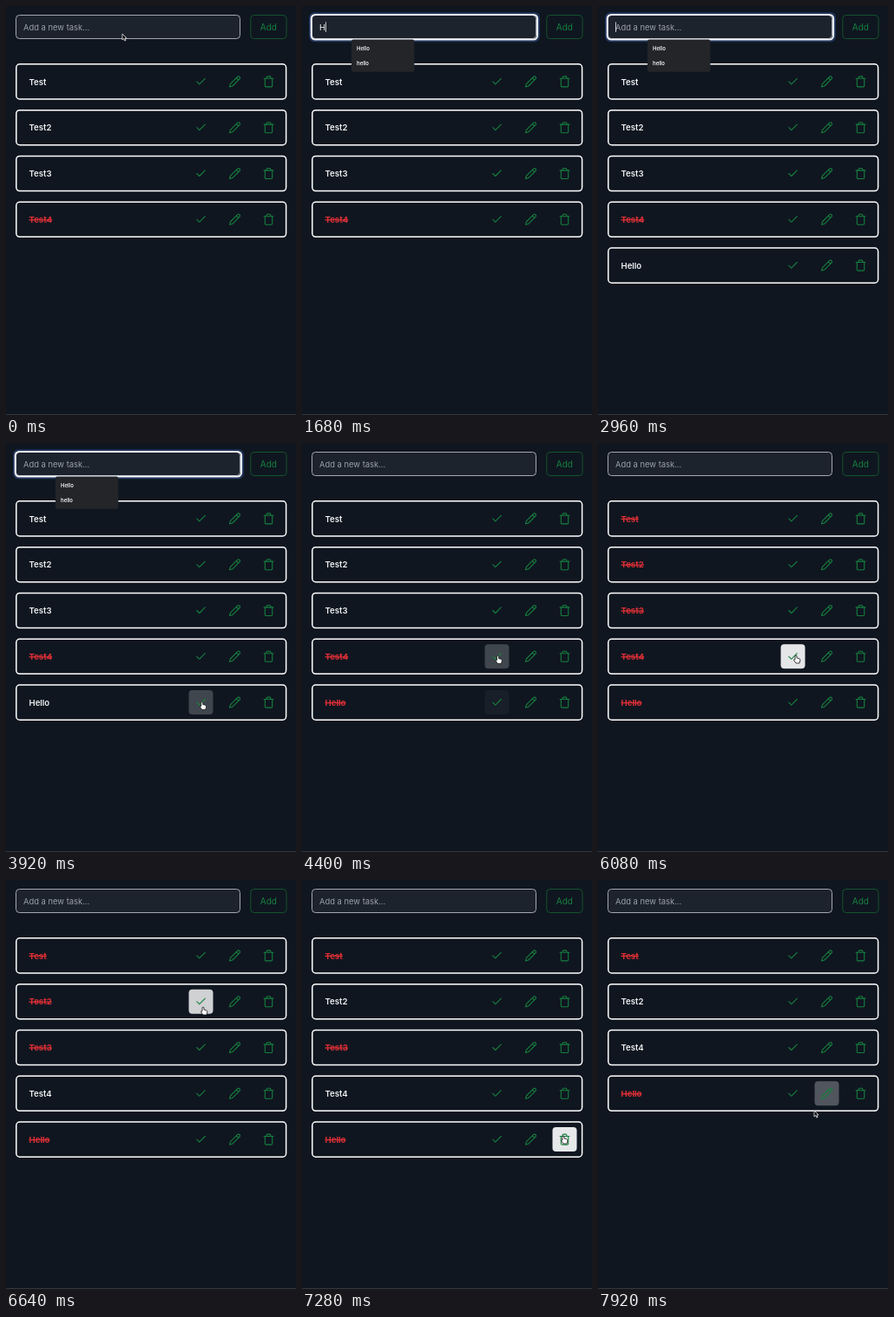
These frames come from a looping animation (334 by 470 pixels, 8 s). An HTML page:

```html
<!DOCTYPE html>
<html lang="en">
<head>
<meta charset="utf-8">
<title>Task list</title>
<style>
  html, body { margin: 0; width: 100%; height: 100%; overflow: hidden; background: #0f1620; }
  svg { display: block; font: 600 9.6px Inter, sans-serif; }
  .icon { fill: none; stroke: #17803f; stroke-width: 1.8; stroke-linecap: round; stroke-linejoin: round; }
  .done text { fill: #dc2f35; font-weight: 700; }
  .strike { stroke: #dc2f35; stroke-width: 1.3; visibility: hidden; }
  .done .strike { visibility: visible; }
</style>
</head>
<body>
<svg width="334" height="470" viewBox="0 0 334 470" fill="#f3f4f6">
  <rect y="469" width="334" height="1" fill="#33383f"/>
  <rect id="field" x="11.5" y="10.5" width="258" height="27" rx="4" fill="#1d232d" stroke="#a3a8b0"/>
  <g id="ring" fill="none">
    <rect x="9" y="8" width="264" height="32.5" rx="5.5" stroke="#223a66" stroke-width="1.6"/>
    <rect x="10.7" y="9.9" width="260.4" height="28.6" rx="4.5" stroke="#f1f5fb" stroke-width="2"/>
  </g>
  <text id="entry" x="20" y="27.8" font-size="9.4" font-weight="400"></text>
  <rect id="caret" y="18.5" width=".8" height="11.5"/>
  <rect x="281.8" y="10.5" width="41.2" height="27" rx="4" fill="none" stroke="#14532d"/>
  <text x="302.4" y="27.8" font-size="10" font-weight="400" fill="#17803f" text-anchor="middle">Add</text>
  <g id="cards"></g>
  <g id="menu" font-size="6">
    <rect x="57" y="38.5" width="72.3" height="37.3" rx="2" fill="#242529"/>
    <text x="63" y="51.2">Hello</text>
    <text x="63" y="67.8">hello</text>
  </g>
  <g id="cursor" stroke-width=".8" stroke-linejoin="round">
    <path id="arrow" fill="#0b0d10" stroke="#e8e8e8" d="M0 0V7L1.7 5.5 2.8 8 4 7.5 2.9 5H5Z"/>
    <path id="hand" fill="#fff" stroke="#111" d="M-1 .6Q0-.6 1 .6V3L4 3.8Q5 4.2 4.8 6L4 9H0L-2.5 5.5Q-2.6 4.2-1 5Z"/>
    <path id="beam" fill="none" stroke="#d5d8dc" d="M0-4H3M1.5-4V2M0 2H3"/>
  </g>
</svg>
<script>
const LOOP = 8000, FADE = 150;
const ROWS = 5, PITCH = 52.8, BUTTON = 28, LEFT = 210.5, TOP = 72.9, STEP = 39;
const FOCUS = 560, TYPE = 1280, ENTER = 2480, REAPPEAR = 3440;
const WORD = 'Hello';

const $ = id => document.getElementById(id);
const show = (el, on) => el.style.display = on ? '' : 'none';
const clamp = x => Math.min(1, Math.max(0, x));

const ICONS = [
  'M20 6 9 17l-5-5',
  'M17 3a2.85 2.83 0 1 1 4 4L7.5 20.5 2 22l1.5-5.5ZM15 5l4 4',
  'M3 6h18M19 6v14c0 1-1 2-2 2H7c-1 0-2-1-2-2V6M8 6V4c0-1 1-2 2-2h4c1 0 2 1 2 2v2'
];

// The pointer rests briefly around each stop; most stops are clicks.
const REST_BEFORE = 110, REST_AFTER = 90;
const stops = [
  { at: REAPPEAR - REST_AFTER, x: 135, y: 33 },
  { at: 4080, x: 228, y: 304, click: true },
  { at: 4740, x: 223, y: 186, click: true },
  { at: 5040, x: 224, y: 139, click: true },
  { at: 5600, x: 222, y: 81, click: true },
  { at: 6110, x: 228, y: 244, click: true },
  { at: 6730, x: 227, y: 146, click: true },
  { at: 7265, x: 301, y: 294 },
  { at: 7600, x: 302, y: 192, click: true },
  { at: 8010, x: 249, y: 265 }
];
const blurTime = stops.find(s => s.click).at;

function pointer(t) {
  const i = Math.max(1, stops.findIndex(s => s.at > t));
  const a = stops[i - 1], b = stops[i], start = a.at + REST_AFTER;
  const u = clamp((t - start) / (b.at - REST_BEFORE - start)), k = u * u * (3 - 2 * u);
  return { x: a.x + (b.x - a.x) * k, y: a.y + (b.y - a.y) * k };
}

// Index of the button under a point, or -1
function buttonAt({ x, y }) {
  const col = Math.floor((x - LEFT) / STEP), row = Math.floor((y - TOP) / PITCH);
  const inside = x - LEFT - col * STEP <= BUTTON && y - TOP - row * PITCH <= BUTTON;
  return inside && col >= 0 && row >= 0 ? row * 3 + col : -1;
}

function tasksAt(t) {
  const tasks = ['Test', 'Test2', 'Test3', 'Test4'].map(name => ({ name, done: name === 'Test4' }));
  if (t >= ENTER) tasks.push({ name: WORD, done: false });
  for (const stop of stops.filter(s => s.click && s.at <= t)) {
    const button = buttonAt(stop), row = Math.floor(button / 3);
    if (button % 3 === 0) tasks[row].done = !tasks[row].done;
    else tasks.splice(row, 1);
  }
  return tasks;
}

// cubic-bezier(.4, 0, .2, 1)
function ease(x) {
  if (x <= 0) return 0;
  if (x >= 1) return 1;
  let lo = 0, hi = 1, u;
  for (let i = 0; i < 14; i++) {
    u = (lo + hi) / 2;
    const v = 1 - u;
    if (1.2 * v * v * u + .6 * v * u * u + u ** 3 < x) lo = u; else hi = u;
  }
  return 3 * u * u - 2 * u ** 3;
}

const visits = [];
for (let t = REAPPEAR, last = -1; t < LOOP; t += 2) {
  const button = buttonAt(pointer(t));
  if (button !== last) {
    if (last >= 0) visits.at(-1).end = t;
    if (button >= 0) visits.push({ button, start: t, end: LOOP });
    last = button;
  }
}

function hoverLevel(button, t) {
  return Math.max(0, ...visits.filter(v => v.button === button && t >= v.start).map(v =>
    ease((Math.min(t, v.end) - v.start) / FADE) * (1 - ease((t - v.end) / FADE))));
}

$('cards').innerHTML = Array.from({ length: ROWS }, (_, row) => `
  <g transform="translate(0 ${row * PITCH})">
    <rect x="11.8" y="66.85" width="310.8" height="40.1" rx="4" fill="none" stroke="#fff" stroke-width="1.5"/>
    <text x="26.5" y="90.6"></text>
    <line class="strike" x1="26.5" y1="87.4" y2="87.4"/>
    ${ICONS.map((d, col) => `
      <g transform="translate(${LEFT + col * STEP} ${TOP})">
        <rect class="hover" width="${BUTTON}" height="${BUTTON}" rx="4" fill="#e7e8ea"/>
        <path class="icon" d="${d}" transform="translate(6.8 6.8) scale(.6)"/>
      </g>`).join('')}
  </g>`).join('');
const cards = [...$('cards').children];
const hovers = [...document.querySelectorAll('.hover')];

function setText(el, text) {
  if (el.textContent !== text) el.textContent = text;
}

function drawCards(t) {
  const tasks = tasksAt(t);
  cards.forEach((card, row) => {
    const task = tasks[row];
    show(card, task);
    if (!task) return;
    const label = card.querySelector('text');
    setText(label, task.name);
    card.classList.toggle('done', task.done);
    card.querySelector('.strike').setAttribute('x2', 26.5 + label.getComputedTextLength());
  });
  hovers.forEach((el, i) => el.setAttribute('opacity', hoverLevel(i, t)));
}

function typedText(t) {
  if (t < TYPE || t >= ENTER) return '';
  return WORD.slice(0, 1 + Math.max(0, Math.floor((t - 1640) / 120)));
}

function drawInput(t) {
  const focused = t >= FOCUS && t < blurTime;
  const text = typedText(t), entry = $('entry');
  setText(entry, text || 'Add a new task...');
  entry.setAttribute('fill', text ? '#f3f4f6' : '#9aa0a9');
  show($('ring'), focused);
  show($('menu'), t >= TYPE && t < blurTime);
  show($('caret'), focused && t < 3200);
  $('caret').setAttribute('x', 20 + (text ? entry.getComputedTextLength() : 0));
}

function drawCursor(t) {
  const moving = t >= REAPPEAR;
  const { x, y } = moving ? pointer(t) : { x: 134, y: 32 };
  const over = moving && buttonAt({ x, y }) >= 0;
  $('cursor').setAttribute('transform', `translate(${x} ${y})`);
  show($('beam'), t >= 80 && t < 1680);
  show($('hand'), over);
  show($('arrow'), t < 80 || moving && !over);
}

function frame() {
  const t = performance.now() % LOOP;
  drawCards(t);
  drawInput(t);
  drawCursor(t);
  requestAnimationFrame(frame);
}
frame();
</script>
</body>
</html>
```
